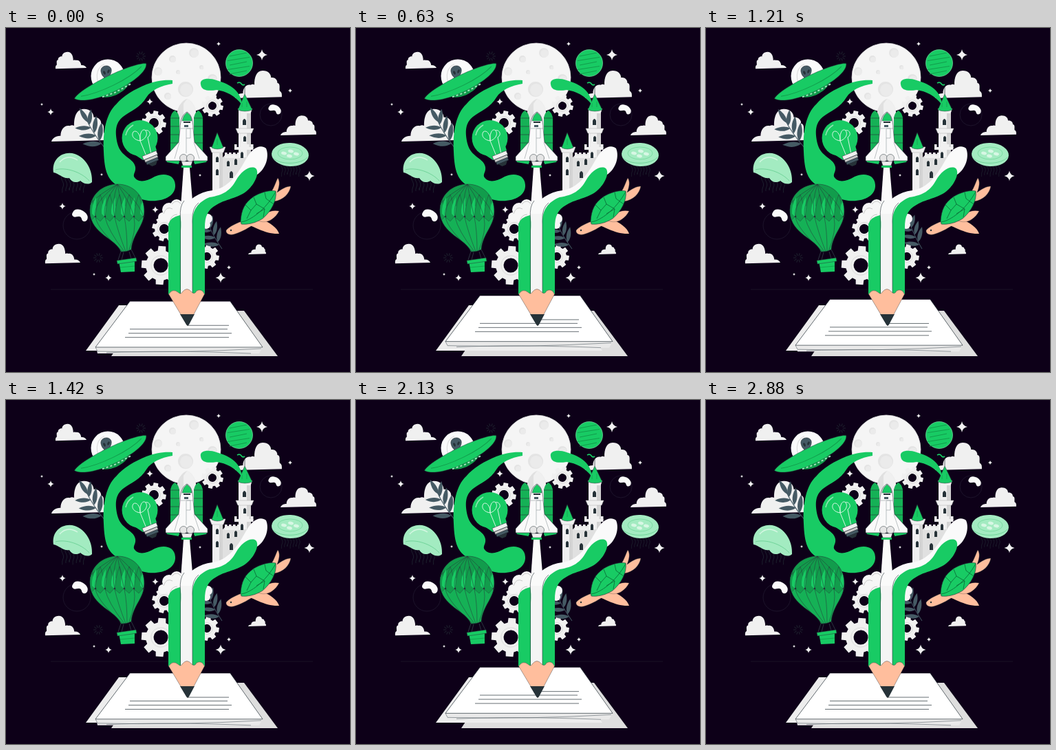
Animation, 500 px wide and 500 px high, one loop 2930 ms. Source, as an HTML page with a canvas:

```html
<!DOCTYPE html>
<html lang="en">
<head>
<meta charset="utf-8">
<title>Pencil of ideas</title>
<style>
html, body { margin: 0; width: 100%; height: 100%; overflow: hidden; background: #0d0018; }
canvas { display: block; width: 500px; height: 500px; }
</style>
</head>
<body>
<canvas id="stage" width="500" height="500"></canvas>
<script>
const ctx = document.getElementById('stage').getContext('2d');
const LOOP = 2930, BEAT = LOOP / 2, DELAY = 25;
const BG = '#0d0018', GREEN = '#18cb64', MID = '#15b156', DEEP = '#129c4c', MINT = '#a3ebc1';
const INK = '#263238', SLATE = '#455a64', PALE = '#f0f0f0', GREY = '#dedede', SKIN = '#ffbe9d';

function shape(d, fill, stroke, width = 0.7) {
  const p = new Path2D(d);
  if (fill) { ctx.fillStyle = fill; ctx.fill(p, 'evenodd'); }
  if (stroke) { ctx.strokeStyle = stroke; ctx.lineWidth = width; ctx.stroke(p); }
}
function oval(x, y, rx, ry, turn, fill, stroke, width = 0.7) {
  ctx.beginPath();
  ctx.ellipse(x, y, rx, ry, turn, 0, Math.PI * 2);
  if (fill) { ctx.fillStyle = fill; ctx.fill(); }
  if (stroke) { ctx.strokeStyle = stroke; ctx.lineWidth = width; ctx.stroke(); }
}
const disc = (x, y, r, fill, stroke, width) => oval(x, y, r, r, 0, fill, stroke, width);
function box(x, y, w, h, fill, stroke) {
  shape(`M${x} ${y}h${w}v${h}h${-w}z`, fill, stroke, 0.5);
}
function at(x, y, turn, draw, sx = 1, sy = sx) {
  ctx.save();
  ctx.translate(x, y);
  ctx.rotate(turn * Math.PI / 180);
  ctx.scale(sx, sy);
  draw();
  ctx.restore();
}

// x, y: lower left corner; flip puts the crest on the left
function cloud(x, y, w, h, flip) {
  at(flip ? x + w : x, y, -1.5, () => shape(
    'M0 0C2-10 8-18 17-17C17-35 24-52 34-48C37-51 40-50 42-48C42-75 47-100 60-100C72-100 78-87 78-73' +
    'C85-75 92-65 91-53C99-50 94-30 96-22C101-17 100-8 100 0Z', PALE), (flip ? -w : w) / 100, h / 100);
}
function sparkle(x, y, r) {
  at(x, y, 0, () => shape('M0-1Q.15-.15 1 0Q.15.15 0 1Q-.15.15-1 0Q-.15-.15 0-1Z', PALE), r);
}
function burst(x, y) {
  for (let i = 0; i < 10; i++) at(x, y, i * 36, () => shape('M3 0H7', null, INK, 0.7));
}
function orbit(x, y, r, bx, by, size) {
  disc(x, y, r, null, '#211a30', 0.8);
  at(bx, by, 20, () => shape('M-11 0C-11-9 5-9 10-2C14 5 7 9 4 5C1 0-2 3-6 5C-10 6-12 3-11 0Z', '#fafafa'), size);
}
function gear(x, y, r, hole, turn = 0) {
  at(x, y, turn, () => {
    ctx.beginPath();
    for (let i = 0; i < 8; i++) {
      const a = i * Math.PI / 4;
      [[-0.27, 0.77], [-0.19, 1], [0.19, 1], [0.27, 0.77]].forEach(([da, k]) =>
        ctx.lineTo(Math.cos(a + da) * r * k, Math.sin(a + da) * r * k));
    }
    ctx.closePath();
    ctx.moveTo(hole, 0);
    ctx.arc(0, 0, hole, 0, Math.PI * 2);
    ctx.fillStyle = PALE;
    ctx.fill('evenodd');
    disc(0, 0, hole + r * 0.13, null, '#c8c8c8', 0.5);
  });
}
function leaf(x, y, turn, size) {
  const blade = 'M0 0C-5-7-6-17 0-29C5-18 5-7 0 0Z';
  at(x, y, turn, () => {
    shape('M0 0Q-3-30 0-50', null, SLATE, 1.1);
    for (let i = 0; i < 3; i++) {
      const k = 0.95 - i * 0.07;
      at(-1, -9 - i * 14, -58, () => shape(blade, SLATE), k);
      at(-1, -14 - i * 14, 40, () => shape(blade, SLATE), k);
    }
    at(0, -46, 2, () => shape(blade, SLATE), 0.85);
  }, size);
}

function sky() {
  shape('M65 380H446', null, '#1d1929', 0.8);
  cloud(72, 58, 45, 24, true);
  cloud(57, 341, 51, 28, true);
  cloud(66, 165, 80, 46);
  cloud(333, 102, 68, 39);
  cloud(399, 156, 52, 28);
  cloud(352, 329, 26, 14);
  [[309, 23, 3], [372, 39, 8], [413, 91, 3], [65, 122, 5], [209, 107, 5], [82, 259, 5], [441, 215, 7.5],
    [149, 363, 5], [312, 363, 7.5], [324, 348, 3], [128, 358, 2], [217, 264, 5], [52, 111, 2],
    [139, 213, 2], [282, 214, 2]].forEach(s => sparkle(...s));
  burst(196, 41);
  burst(134, 334);
  orbit(385, 126, 16, 391, 118, 0.85);
  orbit(103, 287, 20, 108, 272, 1.05);

  disc(262, 72, 50, '#f5f5f5', GREY, 0.8);
  [[261, 89, 11], [273, 36, 7], [221, 63, 6], [300, 74, 7], [242, 45, 5], [284, 57, 3], [235, 99, 5], [250, 64, 3]]
    .forEach(([x, y, r]) => { disc(x, y, r, '#e4e4e4'); disc(x + 1, y + 1, r * 0.82, '#ebebeb'); });

  disc(339, 51, 19.5, GREEN, '#7adfa5', 0.7);
  for (let i = 0; i < 5; i++) {
    const y = 38 + i * 6.5;
    shape(`M${325 - i % 2 * 3} ${y + 3}L${350 + i % 2 * 4} ${y - 2}`, null, DEEP, 1);
  }
}

function saucer() {
  disc(148, 70, 24.5, '#fafafa');
  at(148, 70, -22, () => shape('M-17 9C-17-10-8-18 2-18', null, GREY, 1.2));
  shape('M138 84C138 73 142 71 148 72C155 70 160 74 161 82Z', SLATE);
  shape('M138 63C137 54 151 52 153 60C154 66 149 72 146 73C141 72 139 68 138 63Z', SLATE, INK);
  oval(143, 65, 1.6, 2.8, -0.5, INK);
  oval(149, 63, 1.6, 2.8, 0.5, INK);
  at(152, 78, -24, () => {
    shape('M-24 10Q-20 20 0 21Q22 20 25 9Z', DEEP);
    shape('M-58 1C-44-10 42-13 58-3C52 18-42 23-58 1Z', GREEN, INK, 0.4);
    shape('M-48 2C-22 9 26 8 50-2', null, DEEP, 1);
    for (let i = 0; i < 8; i++) box(-20 + i * 6, 16 - Math.abs(i - 3) * 0.5, 3, 2, '#9de8bb');
  });
}

function tentacles(x, y, size) {
  at(x, y, 0, () => {
    for (let i = 0; i < 7; i++) {
      const p = -18 + i * 6;
      shape(`M${p} 7c-5 9 6 12 1 21c-2 5 0 7-1 ${9 - i % 3 * 4}`, null, INK, 0.8);
    }
  }, size);
}
function jellies() {
  tentacles(97, 208, 0.85);
  tentacles(413, 190, 0.7);
  shape('M69 210C66 190 83 178 100 183C117 189 126 207 125 224C120 229 112 226 108 222C103 226 95 224 92 218C84 220 78 212 69 210Z', MINT);
  shape('M72 206C87 202 109 209 121 222', null, '#63cd8f', 0.8);
  shape('M78 195C85 187 94 186 104 192', null, '#d7f7e4', 1.4);
  oval(413, 184, 27, 17, 0.05, MINT);
  shape('M388 189C398 199 428 199 438 188', null, '#63cd8f', 0.8);
  oval(413, 182, 18, 9, 0, null, '#72d79b', 0.8);
  [[404, 182], [414, 179], [422, 183], [412, 186]].forEach(([a, b]) => oval(a, b, 4, 2.3, 0.2, '#d7f7e4'));
}

function swirl() {
  shape('M242 76C228 75 215 78 204 82C187 89 171 98 160 111C146 124 140 150 142 180C143 208 148 222 164 230C177 238 185 248 207 251C229 253 247 244 246 228C245 213 230 210 216 216C203 224 191 225 186 216C185 211 189 209 188 202C186 189 167 188 162 168C158 150 159 138 170 129C182 120 196 115 204 101C211 90 225 84 242 81Z', GREEN);
}
function bulb() {
  disc(194.5, 160, 26, GREEN);
  shape('M178 178L199 192L219 178L211 151Z', GREEN);
  shape('M204 186L195 164C187 163 181 157 185 151C190 147 196 156 195 164C202 162 207 155 203 149C198 145 194 153 195 164M211 183L206 159C213 154 207 147 203 149', null, '#d9f7e5', 1);
  shape('M174 156Q176 146 185 141', null, '#91e3b3', 1.5);
  at(210, 187, -22, () => {
    box(-11, -5, 22, 6, PALE, INK);
    box(-10, 1, 20, 4, '#c9c9c9', INK);
    box(-9, 5, 18, 4, SLATE, INK);
    shape('M-7 9H7L3 14H-3Z', INK);
  });
}

function balloon() {
  const skin = 'M122 268C121 243 140 227 162 227C185 227 201 244 201 267C201 288 184 299 182 322Q175 326 167 325C160 306 124 300 122 268Z';
  shape('M167 325L163 337M171 326L168 337M179 325L182 335M182 322L188 334', null, '#34434b', 0.8);
  shape(skin, MID);
  ctx.save();
  ctx.clip(new Path2D(skin));
  box(118, 225, 86, 34, DEEP);
  for (let i = 0; i < 7; i++) {
    const x = 116 + i * 14;
    shape(`M${x} 275Q${x + 2} 254 ${x + 7} 242Q${x + 13} 258 ${x + 14} 273L${x + 7} 281Z`, DEEP, INK, 0.4);
    shape(`M${x} 275Q${x + 1} 258 ${x + 1} 246Q${x - 6} 258 ${x - 5} 270Z`, GREEN);
    shape(`M162 227Q${x - 5} 255 ${x} 275Q${x + 4} 294 ${168 + i * 2} 325`, null, INK, 0.5);
    disc(x, 274, 1.3, INK);
  }
  ctx.restore();
  shape(skin, null, INK, 0.5);
  shape('M164 339L187 337L187 354L167 355Z', GREEN);
  shape('M161 338L189 334L190 339L162 343Z', GREEN, INK, 0.5);
  shape('M166 348L187 346', null, DEEP, 0.8);
}

function rocket() {
  shape('M249 190V122C250 113 257 105 263 103C269 105 275 113 276 122V190Z', '#e0e0e0');
  shape('M258 190V110L263 103C269 105 275 113 276 122V190Z', PALE);
  for (const x of [239, 273]) {
    shape(`M${x} 196V130Q${x + 2} 122 ${x + 6.5} 120Q${x + 11} 122 ${x + 13} 130V196Z`, MID);
    for (let y = 131; y < 190; y += 12) shape(`M${x} ${y}h13`, null, INK, 0.6);
  }
  shape('M232 191H251V198L234 195ZM293 191H274V198L291 195Z', GREEN);
  shape('M253 146C253 134 257 125 263 122C269 125 272 134 272 146L274 166L293 187V193H232V187L251 166Z', '#fafafa', INK, 0.6);
  shape('M256 135Q258 126 263 123Q269 126 270 135Z', GREEN, INK, 0.4);
  box(258, 136, 10, 2, INK);
  shape('M254 146H272M262 147V182M252 166L245 190M273 166L281 190M262 146H268V160H262', null, '#8f989c', 0.6);
  box(259, 141, 6, 3, SLATE);
  disc(258, 189, 5.5, '#e6e6e6', INK, 0.5);
  disc(268, 189, 5.5, '#e6e6e6', INK, 0.5);
  shape('M255 194H271L269 200H257Z', PALE, INK, 0.5);
  shape('M255 200H270V203H255Z', GREEN);
}

function arch(x, y, w, h) {
  shape(`M${x} ${y + h}V${y + w / 2}Q${x + w / 2} ${y - w / 2} ${x + w} ${y + w / 2}V${y + h}Z`, INK);
}
function battlement(x, y, n) {
  for (let i = 0; i < n; i++) box(x + i * 6, y, 3.5, 5, PALE);
  box(x, y + 4, n * 6 - 2.5, 4, PALE);
}
function castle() {
  shape('M300 237V181H315V188L320 183H356V215L325 237Z', '#e0e0e0');
  box(338, 118, 18, 70, PALE);
  box(350, 124, 6, 64, '#d4d4d4');
  shape('M334 146H360L357 153H337Z', PALE, '#aaa', 0.5);
  shape('M337 117H358L356 123H339Z', PALE);
  shape('M347 96L337 119Q347 123 358 119Z', GREEN, INK, 0.5);
  shape('M347 96V86', null, INK, 0.7);
  shape('M336 80Q340 78 342 81T347 82', null, GREEN, 1.7);
  battlement(332, 169, 5);
  battlement(318, 181, 4);
  shape('M300 176H315V237H300Z', PALE);
  box(310, 182, 5, 54, '#d4d4d4');
  shape('M296 173H319L316 181H299Z', PALE, '#aaa', 0.5);
  shape('M307 152L299 174Q307 178 316 174Z', GREEN, INK, 0.5);
  [[344, 132, 5, 9], [345, 157, 4, 8], [305, 187, 4, 8], [305, 205, 4, 9], [321, 193, 4, 8],
    [332, 190, 4, 9], [341, 180, 4, 9], [350, 187, 4, 9], [325, 208, 5, 10]].forEach(a => arch(...a));
  shape('M343 109V115M350 107V115M307 161V170', null, DEEP, 0.7);
  shape('M283 82C281 73 295 72 306 76C327 82 342 92 343 112C333 98 320 92 306 90C294 92 284 91 283 82Z', GREEN);
}

function turtle() {
  shape('M383 241C389 235 391 226 395 218C399 223 397 232 394 239C401 234 407 230 414 230C412 241 403 250 390 252Z', SKIN, INK, 0.4);
  shape('M346 280C336 283 325 288 320 294C319 300 327 302 334 299C343 296 354 290 362 284Z', SKIN, INK, 0.4);
  shape('M348 285C359 287 376 300 397 299C394 290 384 283 370 277Z', SKIN);
  shape('M366 280C378 285 390 279 397 266C388 264 380 267 372 273Z', SKIN, INK, 0.3);
  shape('M341 281C342 264 347 254 360 245C370 239 383 235 392 237C394 250 386 266 373 277C362 284 350 286 342 285Z', GREEN, INK, 0.6);
  shape('M342 282C355 280 377 265 392 238M348 257L356 265L350 277M360 246L364 256L376 263L374 275M376 239L378 248L389 256M356 265L364 256M364 270L376 263', null, '#0b713a', 0.9);
  disc(327, 294, 1.2, INK);
}

function plume() {
  [[237, 264, 10], [248, 258, 9], [256, 265, 10], [228, 275, 7], [246, 274, 13], [293, 277, 7], [291, 286, 6]]
    .forEach(([x, y, r]) => disc(x, y, r, '#f6f6f6'));
  shape('M229 270Q233 258 242 263M241 256Q249 247 255 257M238 282Q240 271 249 271', null, '#9b9b9b', 0.5);
  shape('M256 262C266 250 280 238 300 236C322 233 336 214 348 192C357 174 370 168 378 175C383 186 378 205 365 213L340 233L285 268L271 283Z', '#fafafa');
  shape('M258 203H267L272 263V387H253V274Z', '#fafafa');
}
function pencil() {
  box(252.5, 270, 20, 118, '#f4f4f4');
  shape('M236 387V285Q239 275 253 272Q255 280 254 295V387Z', GREEN);
  shape('M271 387V285C270 265 279 253 296 246C316 243 326 236 334 222C342 207 356 199 363 204C368 209 364 222 355 232C341 248 322 247 306 257C293 264 289 274 289 290V387Z', GREEN);
  shape('M253.5 387V276Q252 259 259 251M271 387V280Q270 262 280 254', null, INK, 0.6);
  shape('M236.5 387Q242 378 250 384Q254 388 256 384Q263 375 270 384Q274 388 277 382Q285 378 288.5 387L264 433Z', SKIN, INK, 0.4);
  shape('M253 416H274L266 431Q264 434 262 431Z', INK);
}

function paper(lift) {
  shape('M197 411H346L395 477H153Z', GREY);
  shape('M164 403H310L358 469H116Z', '#ededed');
  at(0, -lift, 0, () => {
    shape('M131 464L133 473H368L373 464Z', '#e9e9e9');
    shape('M130 464L133 470Q250 473 371 466M146 472Q230 468 356 473', null, '#59646a', 0.6);
    shape('M180 397.5H326L373 464H130Z', '#fff');
    shape('M180 397.5L130 464H373L326 397.5', null, INK, 0.7);
    shape('M264 432.3H324M180 437.7H322M178 443.7H328M173 449.7H324', null, INK, 0.7);
  });
}

function draw(now) {
  const turn = Math.PI * 2 / BEAT;
  const sway = Math.sin(now % BEAT * turn);
  ctx.fillStyle = BG;
  ctx.fillRect(0, 0, 500, 500);
  sky();
  saucer();
  jellies();
  gear(215, 138, 18, 7, 10);
  gear(300, 113, 16, 6, 12);
  gear(230, 292, 18, 7, 15);
  gear(225, 345, 28.5, 10.5, 4);
  gear(292, 332, 18, 6, 8);
  leaf(144, 175, -33 + sway * 2.5, 0.98);
  swirl();
  bulb();
  balloon();
  rocket();
  castle();
  turtle();
  leaf(314, 321, -29 - sway * 4, 0.82);
  plume();
  paper(4.5 * (1 - Math.cos((now % BEAT - DELAY) * turn)));
  pencil();
  requestAnimationFrame(draw);
}
draw(performance.now());
</script>
</body>
</html>
```
